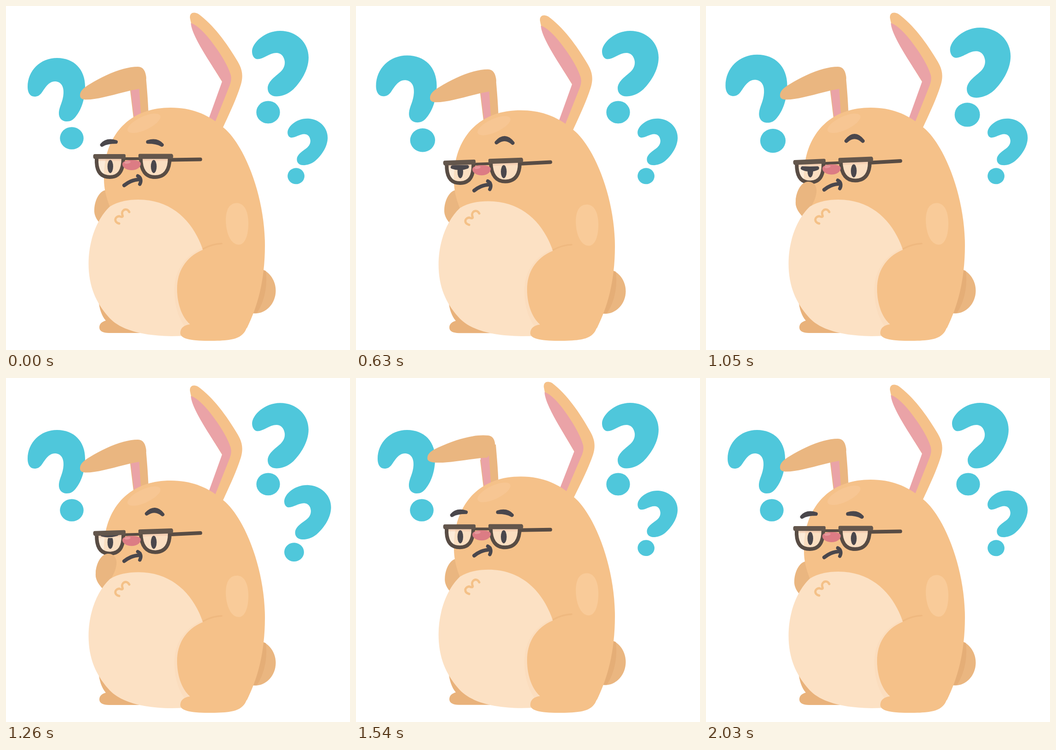
Recreate the animation shown at these times as an HTML page. Size 748 by 748 pixels, loop 2.1 s.

```html
<!DOCTYPE html>
<html lang="en">
<head>
<meta charset="utf-8">
<title>Puzzled rabbit</title>
<style>
html, body { margin: 0; width: 100%; height: 100%; overflow: hidden; background: #fff; }
svg { display: block; width: 100vw; height: 100vh; }
.fur { fill: #f5c189; }
.shade { fill: #eab680; }
.pink { fill: #eaa3a7; }
.belly { fill: #fce1c4; }
.glow { fill: #f9cb99; }
.ask { fill: #4fc7db; }
.ink { fill: #4a474c; }
.line { fill: none; stroke: #4a474c; stroke-linecap: round; stroke-linejoin: round; }
.brow { fill: #4a474c; stroke: #4a474c; stroke-width: 8; stroke-linejoin: round; }
.lens { fill: #fce6d0; opacity: .8; }
.rim { fill: none; stroke: #584c44; stroke-linecap: round; }
</style>
</head>
<body>
<svg viewBox="0 0 748 748">
  <defs>
    <g id="mark">
      <path d="M535 99C535 80 563 54 596 54C632 54 658 80 658 112C658 140 640 166 625 181C612 193 598 196.500 588 196.500C576 196.500 569 189 569 179C569 163 588 152 598 142C604 136 607 128 606 120C604 108 597 102 588 102C573 102 560 115.500 547 115.500C540 115.500 535 108 535 99Z"/>
      <ellipse cx="570" cy="231" rx="25.7" ry="24.5"/>
    </g>
    <path id="paw" d="M210 458C199 446 194 436 195 424C196 402 208 382 222 382C236 382 242 394 240 406C238 422 230 436 217 450Z"/>
    <clipPath id="lid"><rect id="lidBox" x="210" y="330" width="34" height="50"/></clipPath>
  </defs>

  <g class="ask">
    <g id="ask1">
      <path d="M47 176C47 140 75 113 111 113C148 113 172 138 172 175C172 205 162 228 152 240C146 248 140 251 132 251C121 251 114 243 115 231C116 218 124 208 125 190C126 174 119 164 106 164C92 164 84 180 78 188C73 195 68 197 62 197C52 197 47 188 47 176Z"/>
      <ellipse cx="143" cy="287.5" rx="25.7" ry="24.3"/>
    </g>
    <use id="ask2" href="#mark"/>
    <g id="ask3"><use href="#mark" transform="translate(653 316.5) rotate(4) scale(.715) translate(-596 -154.5)"/></g>
  </g>

  <g id="earL">
    <path class="shade" d="M278 250L270 184L288 150H304C306 175 309 205 310 240Z"/>
    <path class="pink" d="M270 172H289L294 246H279Z"/>
    <path class="shade" id="flap" d="M161 195C160 185 170 177 182 170C215 150 255 132 287 132C298 132 304 141 305 158L290 180C250 187 205 203.500 175 203.500C166 203.500 161 201 161 195Z"/>
  </g>
  <g id="earR">
    <path class="fur" d="M400 26C399 14 409 12 418 17C450 40 480 80 504 121C514 138 516 152 511 170C500 205 485 235 470 268L441 250L470 165C440 115 408 70 400 26Z"/>
    <path class="pink" d="M402 37C415 41 430 56 445 75C465 101 480 125 487 145C491 155 490 162 487 171L454 254L439 250L470 164C448 128 403 65 402 37Z"/>
  </g>
  <use class="shade" id="pawBack" href="#paw"/>

  <g id="body">
    <ellipse class="shade" cx="541.5" cy="619" rx="45" ry="49.5"/>
    <path fill="#e5ae77" d="M550 571L565 576C570 615 558 650 545 668L530 667Z"/>
    <path fill="#e9b27b" d="M201 640C203 658 208 674 217 684C207 687 203 692 203 699C203 707 211 711 224 711H296L290 640Z"/>
    <path class="fur" d="M213 376C212 330 225 292 250 264C278 234 315 221 358 221C410 221 445 240 473 264.500C517 300 563 411 563 520C563 600 546 655 524 700L400 700L280 560L226 437C217 414 213 396 213 376Z"/>
    <ellipse fill="#f7c693" cx="300" cy="255" rx="39" ry="14.5" transform="rotate(-25 300 255)"/>
    <path class="glow" d="M502 428.500C518 428.500 527 446 527 473C527 500 519 519 506 519C490 519 478 496 478 465C478 441 487 428.500 502 428.500Z"/>
  </g>

  <g id="face">
    <path class="line" d="M257 390C266 383 275 378 291 377" stroke-width="8"/>
    <path class="line" d="M286.500 369.500C294 373 294.500 381 291 387.500" stroke-width="7.500"/>
    <g id="glasses">
      <path class="lens" d="M197 328V340C198 362 208 372 226 372C246 372 255 358 255 328Z"/>
      <path class="lens" d="M293 328C293 358 304 372 324 372C346 372 356 356 356 328Z"/>
      <path fill="#f4c6a8" opacity=".5" d="M200 332H255V337H200ZM293 332H356V337H293Z"/>
    </g>
    <ellipse class="ink" cx="226.800" cy="349" rx="6.200" ry="14.200" clip-path="url(#lid)"/>
    <ellipse class="ink" cx="321.300" cy="349" rx="6.300" ry="14.200"/>
    <path class="brow" id="browL"/>
    <path class="brow" id="browR"/>
    <g id="frames">
      <path class="rim" d="M360 334.500L422.500 333.500" stroke-width="8"/>
      <path class="rim" d="M256 332H292" stroke-width="6"/>
      <path class="rim" stroke-width="8" d="M197 330V340C198 362 208 372 226 372C246 372 255 358 255 330M293 330C293 358 304 372 324 372C346 372 356 356 356 330"/>
      <path fill="#63564c" d="M193 322H257Q260 322 260 325V330Q260 332.500 257 332.500H193Q189.500 332 189.500 327T193 322ZM291 321.500H360Q363.500 322 363.500 327T360 332.500H291Q288 332.500 288 330V324Q288 321.500 291 321.500Z"/>
    </g>
    <path fill="#dc7c84" d="M253 344C253 338 262 335 274 335C286 335 293 338 293 343C293 351 284 357 273 357C262 357 253 351 253 344Z"/>
    <ellipse cx="264" cy="340" rx="7" ry="2.800" fill="#e6989b" transform="rotate(-8 264 340)"/>
  </g>

  <use class="shade" id="pawFront" href="#paw"/>

  <g id="front">
    <path class="belly" d="M179.500 560C179.500 510 198 462 226 436C245 424 268 421 288 421C362 421 408 470 428 530L440 640L400 716Q380 718 360 718C300 717 248 706 222 675C196 645 179.500 610 179.500 560Z"/>
    <path fill="none" stroke="#f4c188" stroke-width="5" stroke-linecap="round" stroke-linejoin="round" d="M246 473C235 470 235 459 246 457Q256 461 253 454C250 444 262 437 268 448"/>
    <path fill="none" stroke="#fbddbe" stroke-width="10" d="M428 531C388 550 371 582 371 618C371 654 382 682 396 698"/>
    <path class="fur" d="M470 516Q448 518 428 530C390 546 372 578 372 615C372 650 384 678 400 692C386 694 379 701 379 711C379 723 400 728 440 728C490 728 509 724 520 707Q528 692 534 675L550 560Z"/>
    <path fill="none" stroke="#efb980" stroke-width="3.500" stroke-linecap="round" d="M429 528Q449 517 469 516.500"/>
  </g>
</svg>
<script>
const LOOP = 2100, STEP = 70;
const $ = id => document.getElementById(id);
const move = (id, value) => $(id).setAttribute('transform', value);

const part = (t, a, b) => Math.min(1, Math.max(0, (t - a) / (b - a)));
const ease = (t, a, b) => (1 - Math.cos(Math.PI * part(t, a, b))) / 2;
const bump = (t, a, b) => Math.sin(Math.PI * part(t, a, b));

// A crescent through two ends and a bend, blended from rest to pose.
function brow(id, rest, pose, k) {
  const [x0, y0, cx, cy, x1, y1] = rest.map((v, i) => v + (pose[i] - v) * k);
  $(id).setAttribute('d', `M${x0} ${y0}Q${cx} ${cy} ${x1} ${y1}Q${cx} ${cy + 6} ${x0} ${y0}Z`);
}

// Swells, shrinks, swells a little and settles.
function pop(id, x, y, t, size) {
  const wave = .135 * ease(t, 0, 157) - .255 * ease(t, 157, 315)
    + .195 * ease(t, 315, 500) - .075 * ease(t, 500, 630);
  move(id, `translate(${x} ${y}) scale(${1 + size * wave}) translate(${-x} ${-y})`);
}

function draw(t) {
  const jump = bump(t, 1300, 1610);
  const sink = 6 * bump(t, 490, 840) + 3 * bump(t, 1120, 1300) - 10.5 * jump + .8 * bump(t, 1610, 1820);
  const back = 1 - ease(t, 1190, 1400);
  const start = ease(t, 210, 700);

  const squash = `translate(0 728) scale(1 ${1 - sink / 507}) translate(0 -728)`;
  move('body', squash);
  move('front', squash);

  const earY = sink + 2.4 * jump;
  move('earL', `translate(0 ${earY})`);
  move('flap', `rotate(${10 * jump} 300 165) translate(${-5 * jump} 0)`);
  move('earR', `translate(0 ${earY}) rotate(${2.3 * jump} 450 345)`);

  const drop = 9.5 * ease(t, 490, 700) * back + 2 * bump(t, 560, 980);
  const tilt = `rotate(${-.25 * drop} 275 328)`;
  move('face', `translate(0 ${drop + sink * .55})`);
  move('glasses', tilt);
  move('frames', tilt);

  const frown = start ** 2 * back;
  const raise = start ** 3 * back + .2 * bump(t, 630, 910);
  brow('browL', [208.5, 302, 219, 289.5, 239, 295.5], [210, 343, 226, 344, 242, 343], frown);
  brow('browR', [308.5, 295.5, 328, 289.5, 339, 302], [305, 284, 323, 261, 341, 284], raise);
  $('lidBox').setAttribute('y', 330 + 13 * frown);

  const reach = ease(t, 665, 980) - ease(t, 1400, 1650);
  const paw = `translate(${3 * reach - 3} ${18 - 18 * reach - 2 * bump(t, 1820, 2100)})`;
  move('pawBack', paw);
  move('pawFront', paw);
  $('pawFront').style.display = t >= 840 && t < 1330 ? '' : 'none';

  pop('ask1', 109.5, 212, t - 560, 1);
  pop('ask2', 596, 154.5, t - 840, 1);
  pop('ask3', 655.5, 316.5, t - 1120, 1.27);
}

function tick() {
  const t = performance.now() % LOOP;
  draw(Math.floor(t / STEP) * STEP);
  requestAnimationFrame(tick);
}
tick();
</script>
</body>
</html>
```
